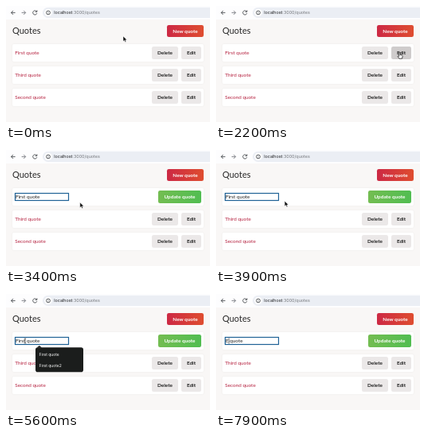
Animation of 256 by 146 pixels, one loop 8 s. Source, as an HTML page:

```html
<!DOCTYPE html>
<html lang="en">
<head>
<meta charset="utf-8">
<title>Quotes</title>
<style>
  html, body { margin: 0; width: 100%; height: 100%; overflow: hidden; background: #f9f7f6; }
  svg { display: block; width: 100%; height: 100%; }
  text { font: 6.4px Lato, sans-serif; fill: #222; white-space: pre; }
  .h1 { font-size: 11px; fill: #292828; }
  .btn text { font-weight: 700; text-anchor: middle; }
  .light text { fill: #fff; }
  .link { fill: #b5213f; }
  .url { font: 5.4px Inter, sans-serif; fill: #1f2023; }
  .item { font: 5px Inter, sans-serif; fill: #fff; }
  .row { fill: #fff; filter: drop-shadow(.4px .8px 1.2px rgba(0, 0, 0, .05)); }
  .icon { fill: none; stroke: #474a4f; stroke-width: .9; }
</style>
</head>
<body>
<svg viewBox="0 0 256 146" preserveAspectRatio="none">
  <defs>
    <linearGradient id="red"><stop stop-color="hsl(350,67%,48%)"/><stop offset="1" stop-color="hsl(10,73%,53%)"/></linearGradient>
    <linearGradient id="green"><stop stop-color="hsl(101,45%,53%)"/><stop offset="1" stop-color="hsl(120,45%,53%)"/></linearGradient>
  </defs>

  <rect width="256" height="17" fill="#fdfdfe"/>
  <rect x="46" y="1.8" width="220" height="13.2" rx="6.6" fill="#ebeef4"/>
  <g class="icon">
    <path d="M11.6 8.4H6.6M9 5.9 6.5 8.4 9 10.9"/>
    <path d="M19.6 8.4h5M22.2 5.9l2.5 2.5-2.5 2.5" stroke="#777a7f"/>
    <path d="M38.5 7A2.6 2.6 0 1 0 38.8 9.2M38.9 5.4V7.4H36.8"/>
  </g>
  <circle cx="53" cy="8.4" r="4.7" fill="#fff"/>
  <circle class="icon" cx="53" cy="8.4" r="2.4" stroke-width=".7"/>
  <path d="M53 8.1v1.5M53 6.9v.6" stroke="#474a4f" stroke-width=".6"/>
  <text class="url" x="60.3" y="10.4">localhost<tspan fill="#74777c">:3000/quotes</tspan></text>

  <text class="h1" x="8" y="35.4">Quotes</text>
  <g id="page"></g>
  <g id="show"></g>

  <g id="form">
    <rect x="11.5" y="54.5" width="67" height="9" fill="#fff" stroke="#1f6296" stroke-width="1.2"/>
    <rect id="mark" y="55.3" height="7.5" fill="#a3cbf5"/>
    <text id="field" x="11.9" y="61.2">First quote</text>
    <rect id="caret" y="55.4" width=".6" height="7.2" fill="#111"/>
  </g>
  <g id="menu">
    <path d="M38.5 67.6 41.8 64.9 45.1 67.6Z" fill="#1b1d1c"/>
    <rect x="37" y="67.2" width="60" height="31" rx="2.8" fill="#1b1d1c"/>
    <text class="item" x="41.5" y="77.8">First quote</text>
    <text class="item" x="41.5" y="91.6">First quote2</text>
  </g>

  <g id="mouse">
    <path id="arrow" d="M0 0V6.6L1.6 5.2 2.6 7.6 3.8 7.1 2.8 4.8H4.9Z" fill="#111" stroke="#fff" stroke-width=".5"/>
    <path id="hand" d="M-.7.6Q0-.4.7.6V3L3 3.5Q3.8 3.8 3.6 4.8L3 7.6H-.6L-2.4 5Q-2.4 4-1.5 4.2L-.7 4.8Z" fill="#fff" stroke="#111" stroke-width=".7"/>
    <path id="beam" d="M-1.2-3.2Q0-3.2 0-2.4 0-3.2 1.2-3.2M0-2.4V2.4M-1.2 3.2Q0 3.2 0 2.4 0 3.2 1.2 3.2" fill="none" stroke="#333" stroke-width=".7"/>
  </g>
</svg>
<script>
const LOOP = 8000, STEP = 100;
const OPEN = 2500, MENU = 4300, DRAG = 5900, HIDE = 6500, TYPE = 7800;
const $ = id => document.getElementById(id);

// Pointer stops: time, x, y
const path = [
  [0, 147, 38], [400, 147, 38], [1200, 206.8, 63], [1300, 206.8, 63],
  [2200, 230.5, 58.6], [2700, 230.5, 58.6], [3300, 92.8, 66], [3700, 92.8, 66],
  [4300, 67, 59], [4700, 67, 59], [5600, 24, 59], [5900, 24, 59], [6400, 12, 59]
];

function add(parent, tag, attrs, label) {
  const el = document.createElementNS('http://www.w3.org/2000/svg', tag);
  for (const k in attrs) el.setAttribute(k, attrs[k]);
  if (label) el.textContent = label;
  return parent.appendChild(el);
}

function button(parent, label, x, y, w, fill) {
  const g = add(parent, 'g', { class: fill ? 'btn light' : 'btn' });
  const box = add(g, 'rect', { x, y, width: w, height: fill === 'red' ? 15 : 16, rx: 2.3, fill: fill ? `url(#${fill})` : '#ebe8e8' });
  add(g, 'text', { x: x + w / 2, y: y + (fill === 'red' ? 9.8 : 10.4) }, label);
  return { box, hit: (px, py) => px >= x && px <= x + w && py >= y && py <= y + 16 };
}

function row(label, y, parent) {
  add($('page'), 'rect', { class: 'row', x: 8, y, width: 240, height: 22, rx: 2 });
  add(parent, 'text', { class: 'link', x: 11.2, y: y + 13.2 }, label);
  return [button(parent, 'Delete', 183, y + 3, 33), button(parent, 'Edit', 220, y + 3, 25)];
}

button($('page'), 'New quote', 202, 24, 46, 'red');
const actions = row('First quote', 48, $('show'));
row('Third quote', 76, $('page'));
row('Second quote', 104, $('page'));
const update = button($('form'), 'Update quote', 191, 51, 54, 'green');

function pointer(t) {
  let i = 0;
  while (i < path.length - 2 && t > path[i + 1][0]) i++;
  const [t0, x0, y0] = path[i], [t1, x1, y1] = path[i + 1];
  const p = Math.min(1, (t - t0) / (t1 - t0)), e = p * p * (3 - 2 * p);
  return [x0 + (x1 - x0) * e, y0 + (y1 - y0) * e];
}

const show = (el, on) => el.setAttribute('display', on ? 'inline' : 'none');

function draw(t) {
  const [x, y] = pointer(t), editing = t >= OPEN, typed = t >= TYPE;
  show($('show'), !editing);
  show($('form'), editing);
  show($('menu'), t >= MENU && !typed);

  let over = editing && update.hit(x, y);
  for (const b of actions) {
    const hit = !editing && b.hit(x, y);
    b.box.setAttribute('fill', hit ? '#cfcccc' : '#ebe8e8');
    over = over || hit;
  }
  const inField = editing && x >= 11 && x <= 79 && y >= 54 && y <= 64;
  show($('hand'), over);
  show($('beam'), inField);
  show($('arrow'), !over && !inField);
  show($('mouse'), t < HIDE);
  $('mouse').setAttribute('transform', `translate(${x} ${y})`);

  const field = $('field'), label = typed ? 'E quote' : 'First quote';
  if (field.textContent !== label) field.textContent = label;
  const selecting = t > DRAG && !typed;
  show($('mark'), selecting);
  show($('caret'), typed);
  if (selecting) {
    const at = i => field.getStartPositionOfChar(i).x;
    let first = 0;
    while (first < 5 && (at(first) + at(first + 1)) / 2 < x) first++;
    $('mark').setAttribute('x', at(first));
    $('mark').setAttribute('width', at(5) - at(first));
  }
  if (typed) $('caret').setAttribute('x', field.getEndPositionOfChar(0).x + .2);
}

function tick() {
  draw(Math.floor(performance.now() % LOOP / STEP) * STEP);
  requestAnimationFrame(tick);
}
tick();
</script>
</body>
</html>
```
